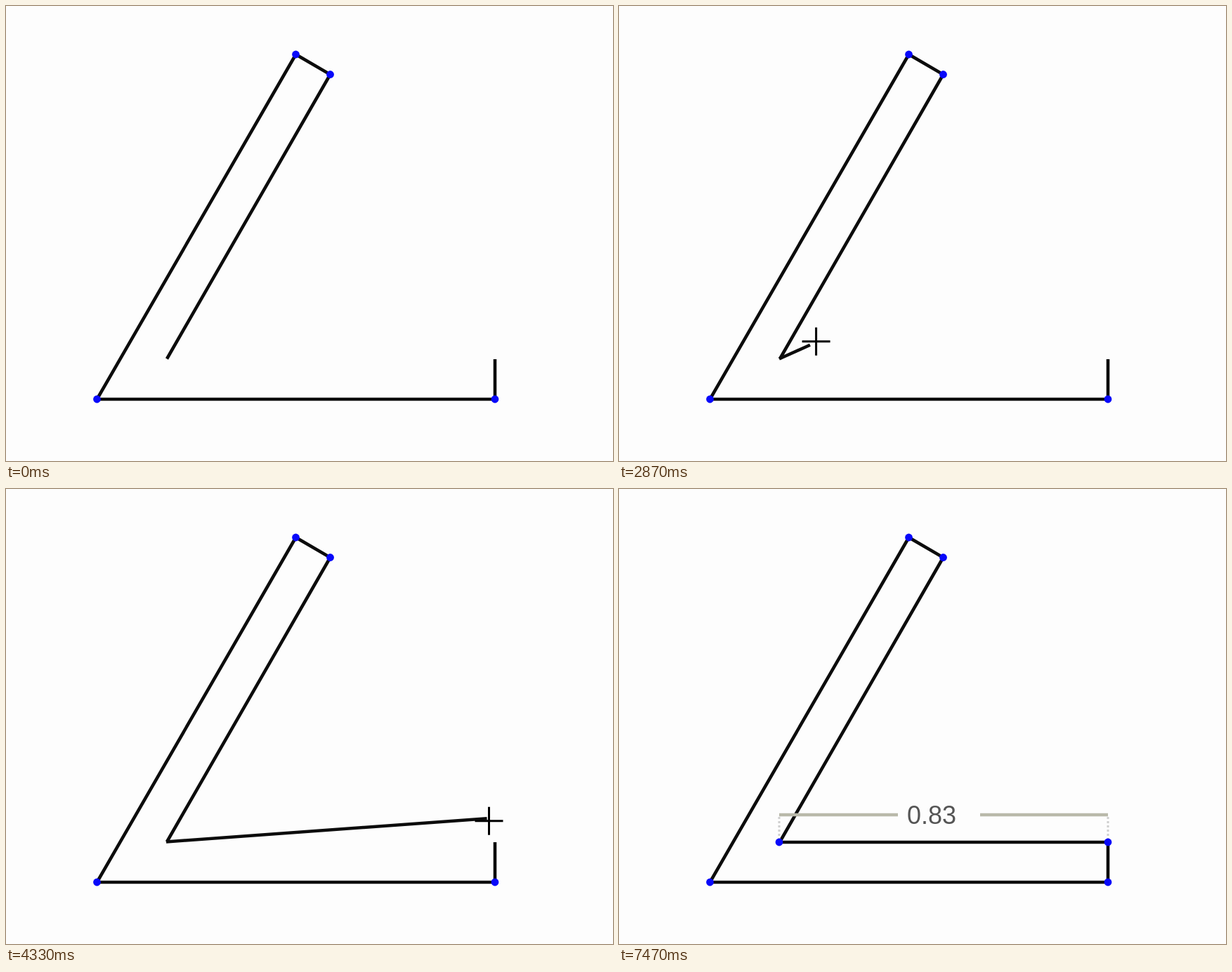
Recreate the animation shown at these times as an HTML page. Size 864x648 px, loop 7510 ms.

```html
<!DOCTYPE html>
<html lang="en">
<head>
<meta charset="utf-8">
<title>Closing an outline</title>
<style>
  html, body { margin: 0; width: 100%; height: 100%; overflow: hidden; background: #fdfdfd; }
  svg { display: block; width: 100vw; height: 100vh; }
  .edge { fill: none; stroke: #0c0c0c; stroke-width: 4.6; }
  .dot { fill: #0808fa; }
  .snap { fill: #0e86c9; }
  .dim { fill: none; stroke: #b9b9aa; stroke-width: 4.4; }
  .ext { fill: none; stroke: #cfcfcf; stroke-width: 3; stroke-dasharray: 3 3; }
  .cross { fill: none; stroke: #000; stroke-width: 3; }
  text { font: 36px "Liberation Sans", Arial, sans-serif; fill: #555; }
  text.editing { fill: #5c5cff; }
  .soft { filter: blur(.45px); }
</style>
</head>
<body>
<svg viewBox="0 0 864 648">
  <g class="soft">
    <path class="edge" d="M229 502.5L461.5 97.500L412.500 69L129.500 560H696V503"/>
    <line id="rubber" class="edge" x1="228" y1="502.5"/>
    <g id="result">
      <path class="ext" d="M228 467V498M696 467V498"/>
      <path class="dim" d="M228 464H397M514 464H696"/>
      <path class="edge" d="M228 503H696"/>
      <text id="label" x="410" y="477">0.83</text>
      <circle class="dot" cx="228" cy="503" r="5.4"/>
      <circle class="dot" cx="696" cy="503" r="5.4"/>
    </g>
    <circle class="dot" cx="129.500" cy="560" r="5.4"/>
    <circle class="dot" cx="412.500" cy="69" r="5.4"/>
    <circle class="dot" cx="461.500" cy="97.500" r="5.4"/>
    <circle class="dot" cx="696" cy="560" r="5.4"/>
  </g>
  <circle id="snap" class="snap" r="13"/>
  <path id="cursor" class="cross" d="M-20 0H20M0 -20V20"/>
</svg>
<script>
const LOOP = 7510, STEP = 1000 / 30;
const START_CLICK = 2550, END_CLICK = 4950, COMMIT = 6500;
const SNAP_RANGE = 22;
const from = [227.5, 502.5], to = [696, 503];

// Pointer path: time, x, y
const path = [
  [1000, 886, 300], [1530, 289, 487], [1800, 239, 504], [2600, 239, 504],
  [3070, 340, 450], [3370, 442, 426], [3830, 606, 425], [3970, 643, 439],
  [4330, 690, 476], [4580, 703, 504], [5100, 703, 504], [5370, 787, 503],
  [5500, 853, 498], [COMMIT, 853, 498]
];

const $ = id => document.getElementById(id);
const rubber = $('rubber'), result = $('result'), label = $('label');
const snap = $('snap'), cursor = $('cursor');

const show = (el, on) => el.setAttribute('visibility', on ? 'visible' : 'hidden');
const slope = (i, k) => (path[i + 1][k] - path[i][k]) / (path[i + 1][0] - path[i][0]);

// Tangent that never overshoots a turning point or a pause
function tangent(i, k) {
  if (i === 0) return slope(0, k);
  if (i === path.length - 1) return 0;
  const a = slope(i - 1, k), b = slope(i, k);
  if (a * b <= 0) return 0;
  const before = path[i][0] - path[i - 1][0], after = path[i + 1][0] - path[i][0];
  return (a * after + b * before) / (before + after);
}

function pointer(t) {
  const last = path.length - 1;
  t = Math.min(Math.max(t, path[0][0]), path[last][0]);
  let i = 0;
  while (i < last - 1 && t > path[i + 1][0]) i++;
  const h = path[i + 1][0] - path[i][0], u = (t - path[i][0]) / h, v = 1 - u;
  return [1, 2].map(k =>
    path[i][k] * (1 + 2 * u) * v * v + tangent(i, k) * h * u * v * v +
    path[i + 1][k] * u * u * (3 - 2 * u) - tangent(i + 1, k) * h * u * u * v);
}

const near = (p, q) => Math.hypot(p[0] - q[0], p[1] - q[1]) < SNAP_RANGE;

function draw(t) {
  const p = pointer(t);
  const drawing = t >= START_CLICK && t < END_CLICK;
  const closed = t >= END_CLICK;
  const editing = t < COMMIT;
  const target = drawing ? to : from;
  const snapped = !closed && near(p, target);

  show(cursor, t >= path[0][0] && editing);
  cursor.setAttribute('transform', `translate(${p[0].toFixed(1)} ${p[1].toFixed(1)})`);

  show(snap, snapped);
  snap.setAttribute('cx', target[0]);
  snap.setAttribute('cy', target[1]);

  // The free end trails the pointer by one step
  const end = snapped ? target : pointer(t - STEP);
  show(rubber, drawing);
  rubber.setAttribute('x2', end[0]);
  rubber.setAttribute('y2', end[1]);

  show(result, closed);
  label.textContent = editing ? '0.83|' : '0.83';
  label.setAttribute('class', editing ? 'editing' : '');
}

const begin = performance.now();
function tick() {
  const t = (performance.now() - begin) % LOOP;
  draw(Math.floor(t / STEP + 0.01) * STEP);
  requestAnimationFrame(tick);
}
draw(0);
requestAnimationFrame(tick);
</script>
</body>
</html>
```
